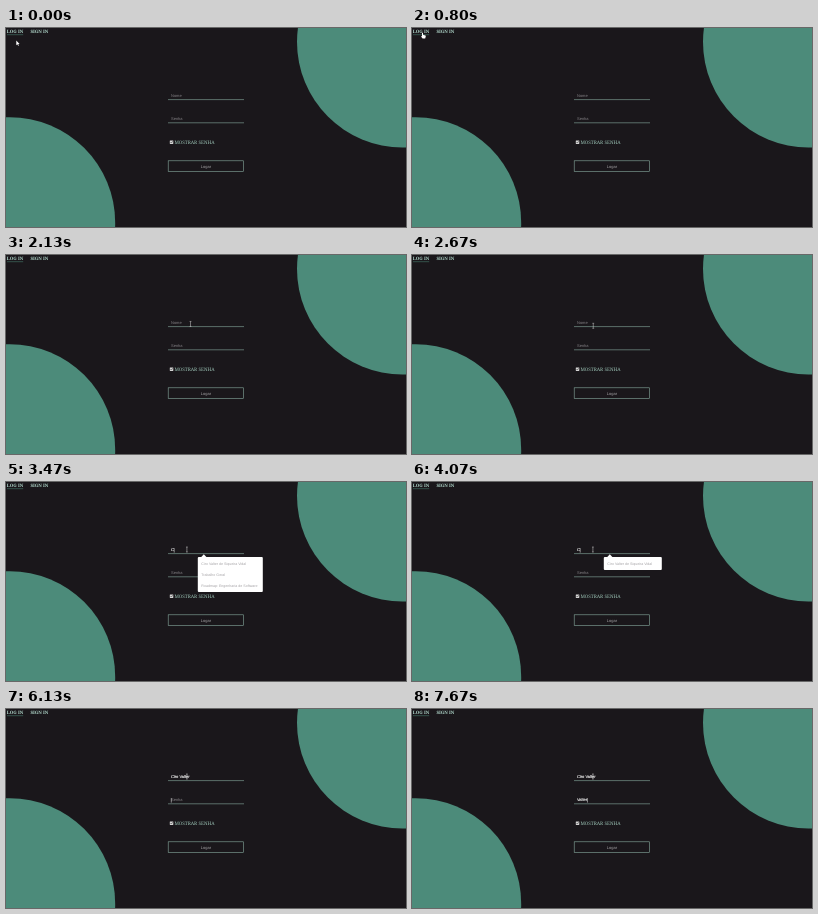
These frames come from a looping animation (400x199 px, 8000 ms). An HTML page:

```html
<!DOCTYPE html>
<html lang="pt-BR">
<head>
<meta charset="utf-8">
<title>Login</title>
<style>
  html, body { margin: 0; width: 100%; height: 100%; overflow: hidden; background: #1a171b; }
  svg { display: block; width: 100%; height: 100%; }
  text { font: 4px "Liberation Sans", Arial, sans-serif; text-rendering: geometricPrecision; white-space: pre; }
  .serif { font: 4.74px "Noto Serif", serif; fill: #9cc4b6; }
  .nav { font-size: 4.5px; font-weight: 700; fill: #b4dccf; }
  .line { fill: none; stroke: #86aa9e; stroke-width: .6; }
  .typed { fill: #fff; stroke: #fff; stroke-width: .12; }
  .hint { fill: #858286; }
  #list text { font-size: 3.6px; fill: #a5a3a6; }
</style>
</head>
<body>
<svg viewBox="0 0 400 199">
  <g fill="#4c8b7a">
    <circle cx="396.5" cy="14" r="105.5"/>
    <circle cx="3.7" cy="194.7" r="105.5"/>
  </g>

  <text class="serif nav" x="0.8" y="5">LOG IN</text>
  <text class="serif nav" x="24.4" y="5">SIGN IN</text>
  <path d="M1 6.7H17.2" stroke="#4c8b7a" stroke-width=".5"/>

  <path class="line" d="M162 71.6H238M162 94.8H238"/>
  <rect class="line" x="162.2" y="132.8" width="75.4" height="10.6"/>
  <text x="199.9" y="139.5" text-anchor="middle" fill="#a5a3a6">Logar</text>

  <rect x="163.8" y="112.4" width="3.5" height="3.5" rx=".4" fill="#d4d4d4"/>
  <path d="M164.5 114.2L165.3 115L166.7 113.3" fill="none" stroke="#333" stroke-width=".6"/>
  <text class="serif" x="168.4" y="116">MOSTRAR SENHA</text>

  <text id="name" x="165" y="69.4"></text>
  <text id="pass" x="165" y="92.4"></text>
  <path id="caret" d="M.3-3.3V1.2" stroke="#fff" stroke-width=".5"/>

  <g id="list">
    <path d="M195 75.2L197.8 72.3L200.6 75.2Z" fill="#fff"/>
    <rect id="panel" x="191.8" y="75" rx="1" fill="#fff"/>
    <text x="195.3" y="83.1">Ciro Valter de Siqueira Vidal</text>
    <g id="more">
      <text x="195.3" y="94">Trabalho Geral</text>
      <text x="195.3" y="104.8">Roadmap: Engenharia de Software</text>
    </g>
  </g>

  <g id="cursor">
    <path id="arrow" d="M0 0V4.8L1.1 3.9L1.8 5.4L2.6 5L1.9 3.5H3.3Z" fill="#fff"/>
    <path id="hand" d="M1 .4Q1.5-.2 2 .4V2.2L4.4 2.8Q4.9 3 4.8 3.6L4.2 6H1.6L0 3.8Q.1 3.2 1 3.8Z" fill="#fff"/>
    <path id="beam" d="M-.9-2.5H.9M0-2.5V2.5M-.9 2.5H.9" stroke="#d0d0d0" stroke-width=".5"/>
  </g>
</svg>
<script>
const $ = id => document.getElementById(id);
const LOOP = 8000, TICK = 1000 / 15, GLIDE = 260;

// Where the pointer arrives, and when
const stops = [
  { at: 0, x: 10.3, y: 12.4 },
  { at: 270, x: 9, y: 4.6 },
  { at: 1270, x: 14, y: 9 },
  { at: 1600, x: 107.7, y: 44.6 },
  { at: 1870, x: 180.5, y: 66.5 },
  { at: 2330, x: 196, y: 76 },
  { at: 2667, x: 181.3, y: 71 },
  { at: 2733, x: 180.9, y: 67.5 }
];

// Bursts of typing, one letter per tick from the given time
const nameKeys = { 3467: "C", 4400: "iro", 4733: " V", 5067: "al", 5467: "ter" };
const passKeys = { 6667: "V", 7267: "alte", 7667: "r" };

const typed = (keys, t) => Object.entries(keys)
  .map(([at, text]) => text.slice(0, Math.max(0, Math.floor((t - at) / TICK + 1)))).join("");

const show = (id, on) => $(id).setAttribute("visibility", on ? "inherit" : "hidden");
const move = (id, x, y) => $(id).setAttribute("transform", `translate(${x} ${y})`);

function fill(id, value, hint) {
  $(id).textContent = value || hint;
  $(id).setAttribute("class", value ? "typed" : "hint");
  return 165 + (value ? $(id).getComputedTextLength() : 0);
}

// Rests at a stop, then glides in a straight line to the next
function pointer(t) {
  let { at, x, y } = stops[0];
  for (const s of stops.slice(1)) {
    const time = Math.min(GLIDE, s.at - at);
    const k = Math.min(1, Math.max(0, 1 - (s.at - t) / time));
    x += (s.x - x) * k;
    y += (s.y - y) * k;
    at = s.at;
  }
  return [x, y];
}

function draw(time) {
  // The screen refreshes 15 times a second
  const t = Math.floor((time % LOOP + 5) / TICK) * TICK + 4;

  const [x, y] = pointer(t);
  const beam = x > 162 && y > 63 && y < 72.5;
  const hand = x < 13 && y < 8;
  move("cursor", x, y);
  show("beam", beam);
  show("hand", hand);
  show("arrow", !beam && !hand);

  const nameEnd = fill("name", typed(nameKeys, t), "Nome");
  const passEnd = fill("pass", typed(passKeys, t), "Senha");
  const open = t >= 2730, all = t < 4070, inPass = t >= 6070;
  move("caret", inPass ? passEnd : nameEnd, inPass ? 92.4 : 69.4);
  show("caret", open && (t < 3130 || t >= 3467));

  show("list", open && !inPass);
  show("more", all);
  $("panel").setAttribute("width", all ? 65 : 58);
  $("panel").setAttribute("height", all ? 35 : 13);
}

const start = performance.now();
function loop() {
  draw(performance.now() - start);
  requestAnimationFrame(loop);
}
loop();
</script>
</body>
</html>
```
